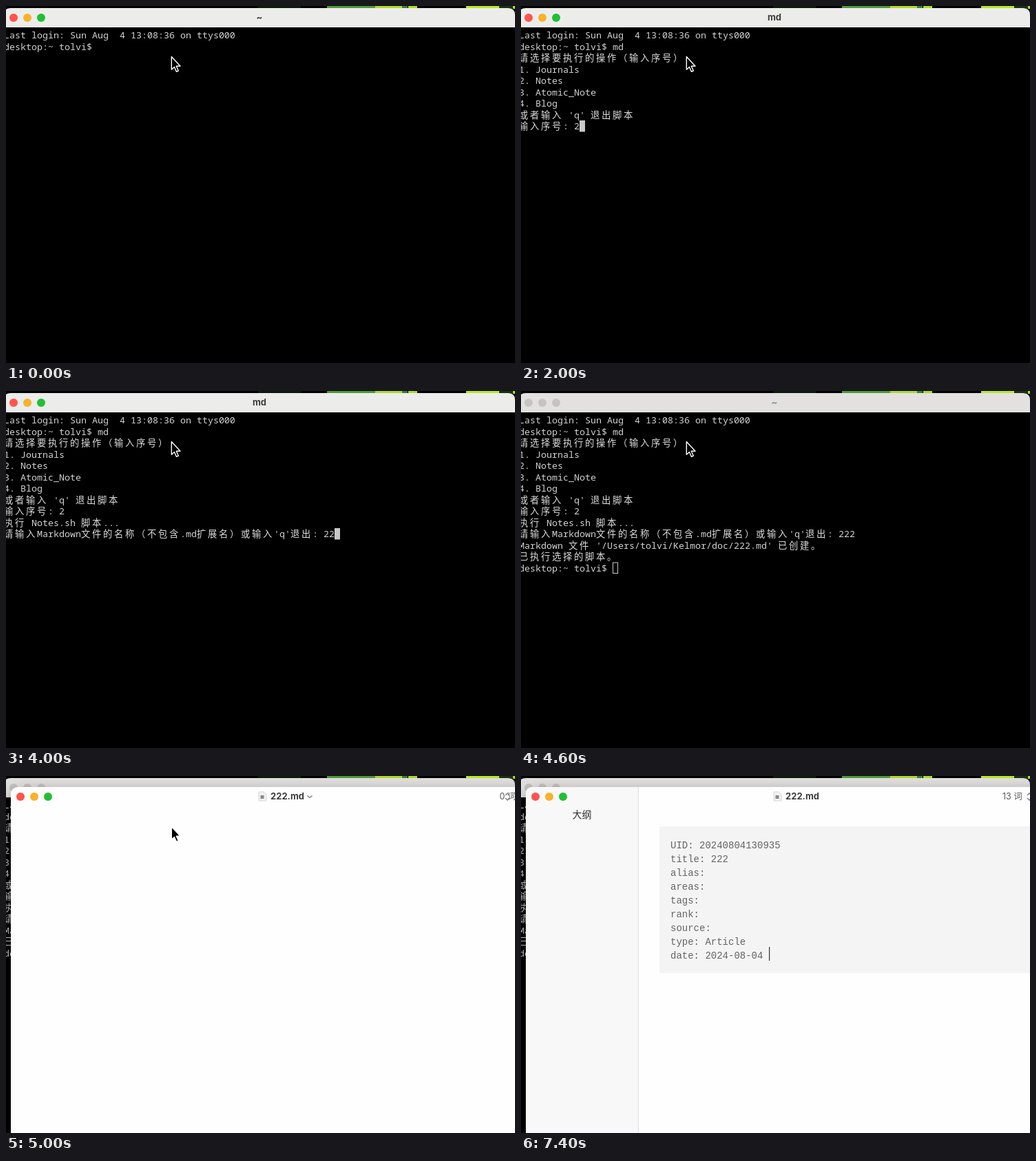
These frames come from a looping animation (739x518 px, 7.6 s). An HTML page:

```html
<!DOCTYPE html>
<html lang="zh">
<head>
<meta charset="utf-8">
<title>Note script</title>
<style>
  html, body { margin: 0; width: 100%; height: 100%; overflow: hidden; background: #000; }
  svg { display: block; width: 100%; height: 100%; }
  text { white-space: pre; text-spacing-trim: space-all; }
  .term { font: 300 13.333px "Noto Sans Mono", "Noto Sans CJK SC", monospace; fill: #d2d2d2; }
  .cjk { font: 400 13.333px "Noto Sans CJK SC", "Noto Sans CJK", sans-serif; letter-spacing: 2.667px; fill: #dcdcdc; }
  .title { font: 700 13px Inter, "Noto Sans CJK SC", sans-serif; fill: #3d3d3d; }
  .count { font: 400 12.5px Inter, "Noto Sans CJK SC", sans-serif; fill: #5c5c5c; }
  .heading { font: 400 14px "Noto Sans CJK SC", "Noto Sans CJK", sans-serif; fill: #303030; }
  .code { font: 400 14px "Liberation Mono", monospace; fill: #646464; }
</style>
</head>
<body>
<svg id="stage" viewBox="0 0 739 518" preserveAspectRatio="xMinYMin meet"></svg>
<script>
const LOOP = 7600, STEP = 200;
const CELL = 8, ROW = 16.5, LEFT = -3, TOP = 34;
const PROMPT = "desktop:~ tolvi$ ";
const ASK_NUMBER = "输入序号: ";
const ASK_NAME = "请输入Markdown文件的名称（不包含.md扩展名）或输入'q'退出: ";
const MENU = ["请选择要执行的操作（输入序号）", "1. Journals", "2. Notes", "3. Atomic_Note", "4. Blog", "或者输入 'q' 退出脚本"];
const NOTE = ["UID: 20240804130935", "title: 222", "alias:", "areas:", "tags:", "rank:", "source:", "type: Article", "date: 2024-08-04 "];
const LIGHTS = ["#ff534d", "#f8b22b", "#22bf34"];
const WIDE = /[\u3000-\uffef]/g;

const stage = document.getElementById("stage");
const rect = (x, y, w, h, fill, extra = "") =>
  `<rect x="${x}" y="${y}" width="${w}" height="${h}" fill="${fill}" ${extra}/>`;
const text = (x, y, cls, body, extra = "") =>
  `<text x="${x}" y="${y}" class="${cls}" ${extra}>${body}</text>`;
const path = (d, extra) => `<path d="${d}" ${extra}/>`;
const lights = (x, y, colors) =>
  colors.map((c, i) => `<circle cx="${x + 20 * i}" cy="${y}" r="6" fill="${c}"/>`).join("");
const between = (t, a, b) => t >= a && t < b;
const typed = (word, t, start) => word.slice(0, Math.max(0, Math.floor((t - start) / STEP) + 1));
const cells = s => s.length + (s.match(WIDE) || []).length;

const DEFS = `<defs><filter id="shadow" x="-10%" y="-10%" width="120%" height="125%">
  <feDropShadow dx="0" dy="9" stdDeviation="13" flood-opacity=".42"/></filter></defs>`;

const BACKDROP = rect(0, 0, 739, 518, "#000") +
  [[366, 62, "#0c1c0a"], [466, 70, "#4d9a38"], [536, 39, "#afd92a"], [575, 8, "#3c7f2c"],
   [584, 13, "#a8dc22"], [668, 48, "#b8e81f"], [716, 20, "#17320f"], [736, 3, "#a8dc22"]]
    .map(([x, w, c]) => rect(x, 0, w, 4, c)).join("");

function terminalLines(t) {
  const lines = ["Last login: Sun Aug  4 13:08:36 on ttys000", PROMPT + typed("md", t, 400)];
  if (t >= 800) lines.push(...MENU, ASK_NUMBER + typed("2", t, 2000));
  if (t >= 2600) lines.push("执行 Notes.sh 脚本...", ASK_NAME + typed("222", t, 3800));
  if (t >= 4400) lines.push("Markdown 文件 '/Users/tolvi/Kelmor/doc/222.md' 已创建。", "已执行选择的脚本。", PROMPT);
  return lines;
}

function terminal(t) {
  const active = t < 4600;
  const running = between(t, 800, 4400);
  const hidden = t < 200 || between(t, 1200, 1800) || between(t, 3400, 3800);
  const lines = terminalLines(t);
  const row = lines.length - 1;
  const x = LEFT + CELL * cells(lines[row]), y = TOP + ROW * row;
  const cursor = hidden ? "" : active
    ? rect(x, y, CELL, ROW, "#c8c8c8")
    : rect(x + .5, y + .5, CELL - 1, ROW - 1, "none", 'stroke="#c8c8c8"');
  const body = lines.map((line, i) => text(LEFT, TOP + 13 + ROW * i, "term",
    line.replace(/[\u3000-\uffef]+/g, run => `<tspan class="cjk">${run}</tspan>`))).join("");
  return rect(-3, 3, 742, 540, "#000", 'rx="10"') +
    path("M-3 31V13Q-3 3 7 3H729Q739 3 739 13V31Z", `fill="${active ? "#ecedea" : "#e2e1df"}"`) +
    lights(11, 17, active ? LIGHTS : Array(3).fill("#c6c4c3")) +
    text(368, 21, "title", running ? "md" : "~", `text-anchor="middle" ${active ? "" : 'opacity=".5"'}`) +
    body + cursor;
}

function note(t) {
  const caret = Math.floor((t + 100) / 500) % 2;
  return rect(201, 73, 597, 213, "#f4f4f4", 'rx="3"') +
    NOTE.map((line, i) => text(217, 105 + 20 * i, "code", line)).join("") +
    (caret ? rect(360, 248, 1.2, 20, "#333") : "");
}

function editor(t) {
  const opening = t < 5000, outline = t >= 5400, filled = t >= 5600;
  const place = opening ? 'transform="translate(108.4 109.4) scale(.664)" opacity=".63"' : "";
  const line = 'fill="none" stroke="#777" stroke-width="1.3"';
  const arrows = x => path(`M${x - 3} 28l3-3 3 3M${x - 3} 32l3 3 3-3`, line);
  let out = rect(7, 16, 791, 600, "#fefefe", 'rx="10"');
  if (outline) {
    out += path("M7 616V26Q7 16 17 16H170V616Z", 'fill="#f8f8f8"') +
      rect(170, 16, 1, 600, "#e1e1e1") + text(74.5, 61, "heading", "大纲");
  }
  out += lights(21, 30, LIGHTS) +
    path("M367 23h7l4 4v9h-11z", 'fill="#f1f1f1" stroke="#d0d0d0" stroke-width=".8"') +
    rect(369.5, 28, 5, 5, "#8a8a8a") + text(384, 34, "title", "222.md");
  if (!outline) out += path("M437.5 28.5l3.5 3 3.5-3", line);
  out += filled
    ? text(699, 34, "count", "13 词") + arrows(738)
    : text(716.5, 34, "count", "0 词") + arrows(728);
  if (filled) out += note(t);
  return `<g ${place}><g ${opening ? "" : 'filter="url(#shadow)"'}>${out}</g></g>`;
}

const POINTER = path("M240.3 73.5V92.2L244.4 88.5 247.4 95.3 250.3 94 247.3 87.3H253Z",
  'fill="#000" stroke="#fff" stroke-width="1.4" stroke-linejoin="round"');

function draw(t) {
  stage.innerHTML = DEFS + BACKDROP + terminal(t) +
    (t >= 4800 ? editor(t) : "") + (t < 5400 ? POINTER : "");
}

const start = performance.now();
let shown = -1;
function tick() {
  const t = Math.floor(((performance.now() - start) % LOOP) / STEP) * STEP;
  if (t !== shown) draw(shown = t);
  requestAnimationFrame(tick);
}
tick();
</script>
</body>
</html>
```
